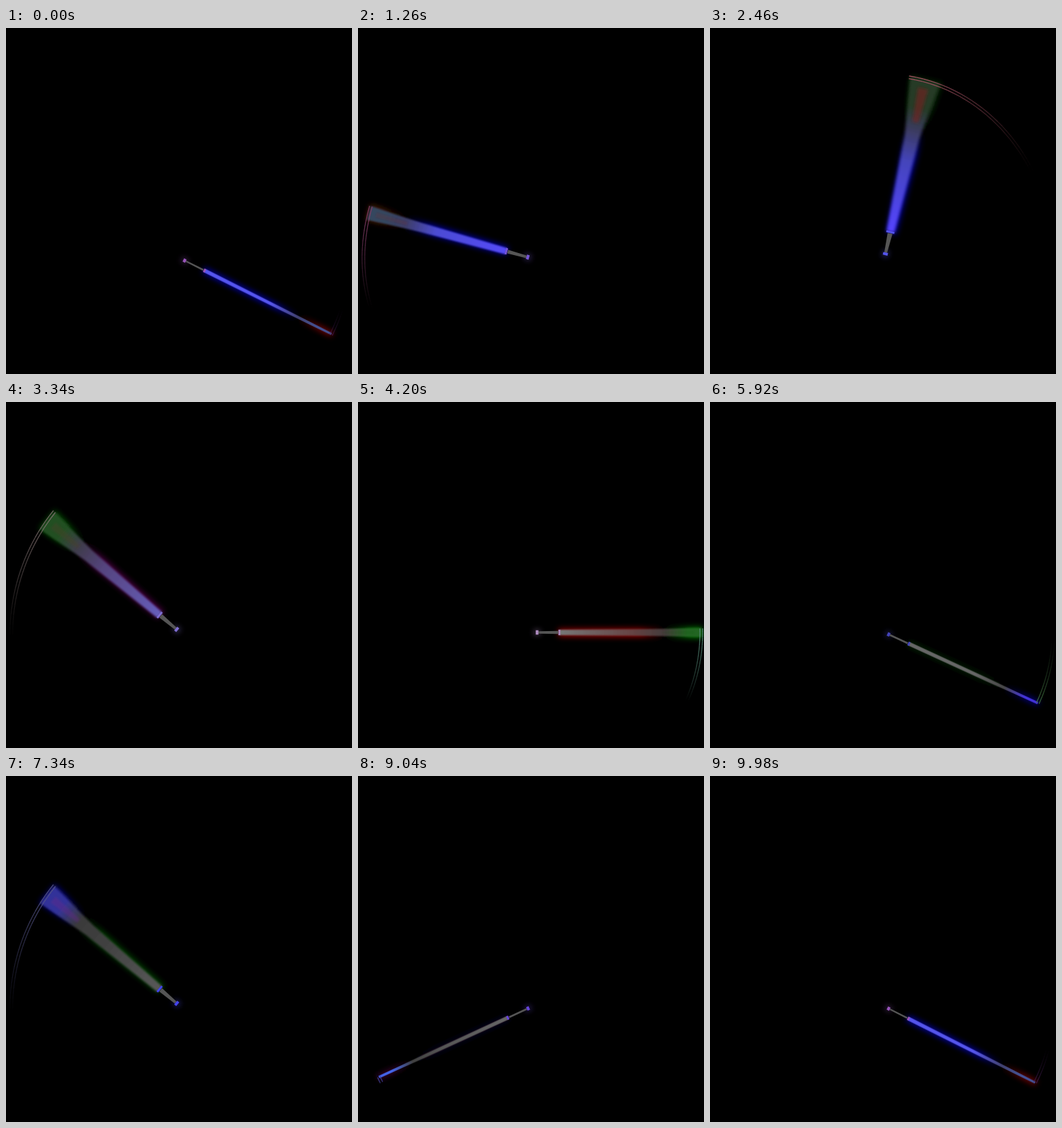
These frames come from a looping animation (512x512 px, 10000 ms). An HTML page:

```html
<!DOCTYPE html>
<html lang="en">
<head>
<meta charset="utf-8">
<title>Swinging beam</title>
<style>
html, body { margin: 0; width: 100%; height: 100%; overflow: hidden; background: #000; }
svg { display: block; width: 100vw; height: 100vh; background: #000; }
</style>
</head>
<body>
<svg id="stage" viewBox="0 0 512 512">
  <defs>
    <filter id="wide" filterUnits="userSpaceOnUse" x="-30" y="-80" width="340" height="160"><feGaussianBlur stdDeviation="4"/></filter>
    <filter id="soft" filterUnits="userSpaceOnUse" x="-30" y="-80" width="340" height="160"><feGaussianBlur id="blur" stdDeviation="0.7"/></filter>
    <linearGradient id="core" gradientUnits="userSpaceOnUse" x1="40" x2="255">
      <stop offset="0"/><stop offset=".5"/><stop offset=".72"/><stop offset=".88"/>
    </linearGradient>
    <linearGradient id="halo" gradientUnits="userSpaceOnUse" x1="40" x2="255">
      <stop offset="0"/><stop offset=".55"/><stop offset=".72" stop-color="#000"/><stop offset=".9"/>
    </linearGradient>
  </defs>
  <g id="arm">
    <path id="glow" fill="url(#halo)" stroke="url(#halo)" stroke-width="3" filter="url(#wide)"/>
    <path id="knobGlow" fill="none" stroke-width="8" stroke-opacity=".6" filter="url(#wide)"/>
    <path id="blade" fill="url(#core)" filter="url(#soft)"/>
    <path id="streak" filter="url(#soft)"/>
    <path id="grip" fill="#555"/>
    <path id="knob" fill="none" stroke-width="4"/>
    <path id="collar" fill="none" stroke-width="3"/>
  </g>
  <g id="trail" fill="none" stroke-width="1.4"></g>
</svg>
<script>
const LOOP = 10000, HALF = 1000, LOW = -26.8, SWEEP = 233.6;
const CX = 258, CY = 341, SEGS = 24, LIFE = 150;
const times = [0, 2460, 4200, 5920, 7340, 9040, 10000];
const colors = {
  base: '#55e #54f #777 #666 #585858 #666 #55e',
  mid: '#55e #44b #644 #666 #404040 #555 #55e',
  end: '#459 #253a25 #262 #43d #339 #46e #459',
  halo: '#00a #008 #900 #020 #040 #102 #00a',
  tip: '#800 #131 #070 #008 #118 #403 #800',
  streak: '#722 #722 #252 #44a #628 #628 #722',
  trail: '#526 #a56 #587 #474 #558 #449 #526',
  knob: '#95b #55e #a8b #44b #44e #64d #95b'
};

const $ = id => document.getElementById(id);
const rad = d => d * Math.PI / 180;
const mix = (a, b, k) => a.map((v, i) => v + (b[i] - v) * k);
const css = c => `rgb(${c.map(Math.round)})`;
const n = v => v.toFixed(2);

function parse(hex) {
  let h = hex.slice(1);
  if (h.length === 3) h = h.replace(/./g, '$&$&');
  return [0, 2, 4].map(i => parseInt(h.substr(i, 2), 16));
}
for (const k in colors) colors[k] = colors[k].split(' ').map(parse);

function colorAt(name, t) {
  let i = 0;
  while (i < times.length - 2 && t >= times[i + 1]) i++;
  const k = (t - times[i]) / (times[i + 1] - times[i]);
  return mix(colors[name][i], colors[name][i + 1], k);
}

// Angle in degrees above the right horizon, with direction and speed
function swing(t) {
  const u = (t + 20 + LOOP) % (2 * HALF);
  const back = u >= HALF;
  let x = (u % HALF) / HALF;
  x -= .016 * Math.exp(-(((x - .5) / .08) ** 2));
  const p = (1 - Math.cos(Math.PI * x)) / 2;
  return {
    angle: LOW + SWEEP * (back ? 1 - p : p),
    dir: back ? -1 : 1,
    speed: Math.sin(Math.PI * Math.max(0, x))
  };
}

const reach = a => 252 + 21 * Math.max(0, Math.sin(rad(a))) ** 2.5;

function point(a, off) {
  const r = reach(a) + off;
  return n(CX + r * Math.cos(rad(a))) + ' ' + n(CY - r * Math.sin(rad(a)));
}

// Outline mirrored about the axis, from [distance, half width] pairs
function outline(pairs) {
  const top = pairs.map(([x, w]) => `${n(x)} ${n(-w)}`);
  const low = pairs.map(([x, w]) => `${n(x)} ${n(w)}`).reverse();
  return 'M' + top.concat(low).join('L') + 'Z';
}

const parts = [];
for (let i = 0; i < SEGS; i++) {
  const p = document.createElementNS('http://www.w3.org/2000/svg', 'path');
  p.setAttribute('stroke-opacity', n(.9 * (1 - i / SEGS) ** 1.3));
  $('trail').append(p);
  parts.push(p);
}

function paintStops(id, list) {
  const stops = $(id).children;
  list.forEach((c, i) => stops[i].setAttribute('stop-color', css(c)));
}

function draw(t) {
  const { angle, dir, speed } = swing(t);
  const spread = 5.2 * speed ** 3;
  const root = 2.7 + 3.4 * speed ** 2;
  const len = reach(angle);
  const flare = len * Math.sin(rad(spread));
  const end = 1.6 + .85 * flare;
  const waist = .85 * root + .25 * flare;
  const shape = outline([[40, root], [.68 * len, waist], [.84 * len, (waist + end) / 2], [len - 2, end]]);
  const knobLine = `M7 ${n(-2.6 - speed)}V${n(2.6 + speed)}`;

  $('arm').setAttribute('transform', `translate(${CX} ${CY}) rotate(${n(-angle)})`);
  $('blade').setAttribute('d', shape);
  $('blur').setAttribute('stdDeviation', n(.6 + 1.4 * speed ** 4));
  $('glow').setAttribute('d', shape);
  $('glow').setAttribute('transform', `translate(0 ${n(2 * speed ** 4)})`);
  $('streak').setAttribute('d', outline([[.76 * len, .2 * end], [.95 * len, .35 * end]]));
  $('streak').setAttribute('fill-opacity', n(.6 * speed ** 4));
  $('grip').setAttribute('d', outline([[9, 1.1 + speed], [38, 1.3 + 2.4 * speed ** 2]]));
  $('knob').setAttribute('d', knobLine);
  $('knobGlow').setAttribute('d', knobLine);
  $('collar').setAttribute('d', `M40 ${n(-root)}V${n(root)}`);

  const base = colorAt('base', t), mid = colorAt('mid', t), tip = colorAt('end', t);
  const halo = colorAt('halo', t), knob = css(colorAt('knob', t));
  paintStops('core', [base, mid, mix(mid, [55, 55, 55], .7), tip]);
  paintStops('halo', [halo, halo, [0, 0, 0], colorAt('tip', t)]);
  $('streak').setAttribute('fill', css(colorAt('streak', t)));
  for (const id of ['knob', 'knobGlow', 'collar']) $(id).setAttribute('stroke', knob);
  $('trail').setAttribute('stroke', css(colorAt('trail', t)));

  let from = angle + dir * spread;
  parts.forEach((p, i) => {
    const age = (i + 1) / SEGS;
    const to = swing(t - LIFE * age).angle + dir * spread * (1 - age);
    p.setAttribute('d', [-4, 0].map(o => `M${point(from, o)}L${point(to, o)}`).join(''));
    from = to;
  });
}

const start = performance.now();
function tick() {
  const t = (performance.now() - start) % LOOP;
  draw(Math.floor(t / 20) * 20);
  requestAnimationFrame(tick);
}
tick();
</script>
</body>
</html>
```
